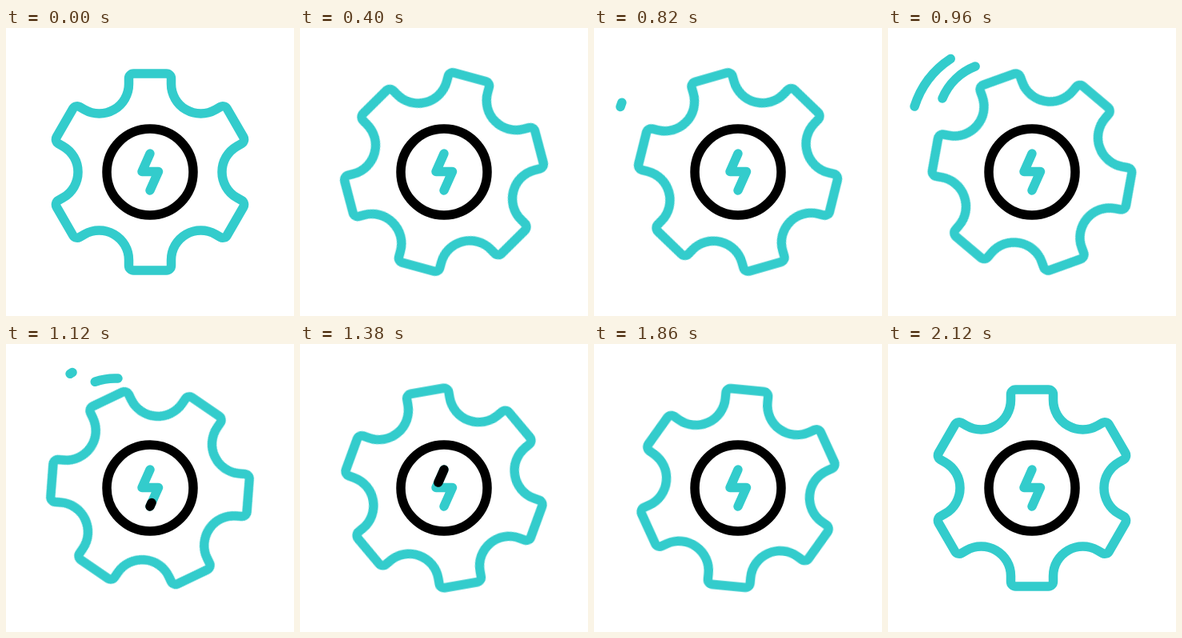
Recreate the animation shown at these times as an HTML page. Size 360 px wide and 360 px high, loop 3 s.

```html
<!DOCTYPE html>
<html lang="en">
<head>
<meta charset="utf-8">
<title>Spinning gear</title>
<style>
  @property --head { syntax: '<length>'; inherits: false; initial-value: 0px; }
  @property --tail { syntax: '<length>'; inherits: false; initial-value: 0px; }

  html, body { margin: 0; width: 100%; height: 100%; overflow: hidden; background: #fff; }
  svg { display: block; width: 100vw; height: 100vh; }
  path, circle {
    fill: none;
    stroke: #33cccc;
    stroke-width: 11.5;
    stroke-linecap: round;
    stroke-linejoin: round;
  }
  .dark { stroke: #000; }

  #gear {
    transform-origin: 180px 180px;
    animation: spin 3s infinite ease-in-out;
  }
  @keyframes spin {
    0%, 10.133% { transform: rotate(0deg); }
    33.667% { transform: rotate(404deg); }
    46.333% { transform: rotate(350deg); }
    58% { transform: rotate(367deg); }
    70.667%, 100% { transform: rotate(360deg); }
  }

  /* A stroke that runs along its path: the head leads, the tail follows. */
  .run {
    visibility: hidden;
    stroke-dasharray: calc(var(--head) - var(--tail)) 300px;
    stroke-dashoffset: calc(0px - var(--tail));
    animation: head 3s infinite ease-in-out, tail 3s infinite ease-in-out, show 3s infinite step-end;
    animation-delay: var(--start);
  }
  @keyframes head {
    0% { --head: 0px; }
    7.4%, 100% { --head: 100px; }
  }
  @keyframes tail {
    0%, 5.667% { --tail: 0px; }
    12.333%, 100% { --tail: 100px; }
  }
  @keyframes show {
    0% { visibility: visible; }
    12.333%, 100% { visibility: hidden; }
  }
</style>
</head>
<body>
<svg viewBox="0 0 360 360">
  <path id="gear"/>
  <circle class="dark" cx="180" cy="180" r="54"/>
  <path d="M180 203L190.500 179.500H170L180 157"/>
  <path class="run dark" pathLength="100" style="--start: 1080ms" d="M180 203L190.500 179.500H170L180 157"/>
  <path class="run" pathLength="100" style="--start: 780ms" d="M33 98.500A112 112 0 0 1 83 35.500"/>
  <path class="run" pathLength="100" style="--start: 830ms" d="M68 88A74 74 0 0 1 140 43"/>
</svg>
<script>
  const TEETH = 6;
  const HALF = 26.5, TOP = 123, BASE = 110, CORNER = 6, VALLEY = 37;

  // Point of a tooth, turned to its place around the centre.
  function at(tooth, x, y) {
    const a = tooth * 2 * Math.PI / TEETH;
    const px = 180 + x * Math.cos(a) - y * Math.sin(a);
    const py = 180 + x * Math.sin(a) + y * Math.cos(a);
    return px.toFixed(2) + ' ' + py.toFixed(2);
  }

  const arc = (r, sweep, end) => `A${r} ${r} 0 0 ${sweep} ${end}`;

  let d = 'M' + at(0, -HALF, -BASE);
  for (let i = 0; i < TEETH; i++) {
    d += 'L' + at(i, -HALF, CORNER - TOP)
      + arc(CORNER, 1, at(i, CORNER - HALF, -TOP))
      + 'L' + at(i, HALF - CORNER, -TOP)
      + arc(CORNER, 1, at(i, HALF, CORNER - TOP))
      + 'L' + at(i, HALF, -BASE)
      + arc(VALLEY, 0, at(i + 1, -HALF, -BASE));
  }
  document.getElementById('gear').setAttribute('d', d + 'Z');
</script>
</body>
</html>
```
